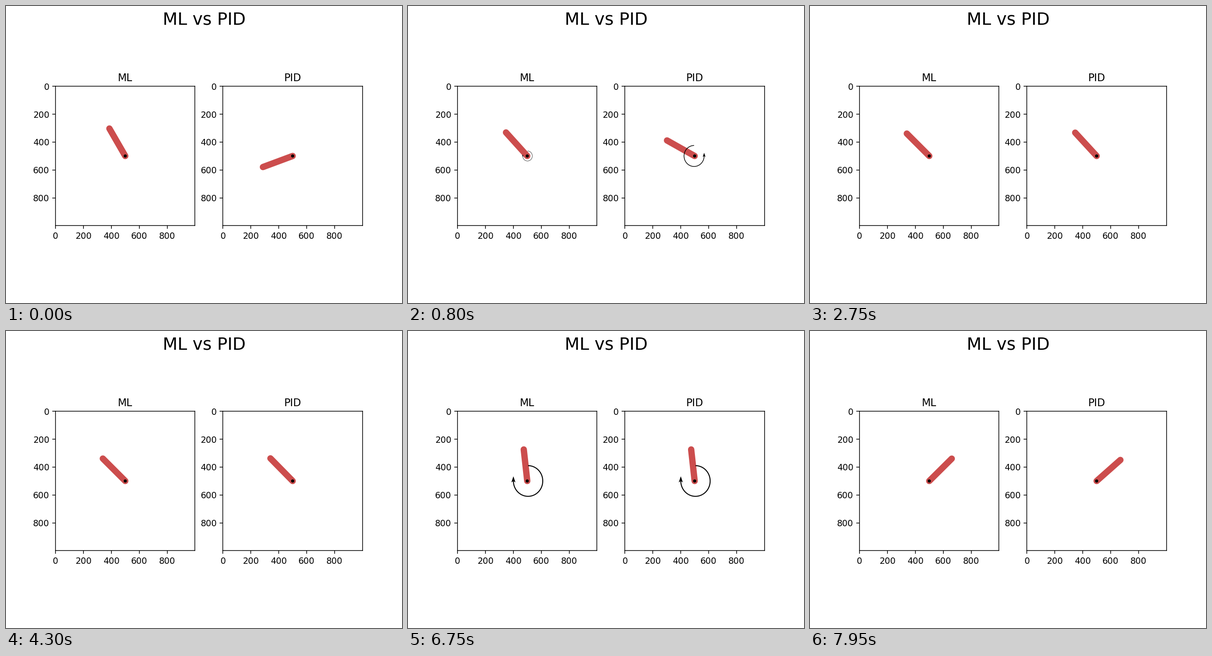
Animation of 864 by 648 pixels, one loop 8 s. Source, as a matplotlib script:

```python
import numpy as np
import matplotlib.pyplot as plt
from matplotlib.animation import FuncAnimation

DPI = 135
FRAMES, INTERVAL = 160, 50
DT = INTERVAL / 1000
SWITCH_STEP = 127            # the setpoint flips from 135 to 45 degrees here
MAX_TORQUE = 2.0
CENTER = 499.5
UNIT = 1000 / 4.4            # data units per rod length
UNIT_PX = UNIT * 0.30436     # screen pixels per rod length


def px_to_pt(pixels):
    return pixels * 72 / DPI


def simulate(angle, speed, kp, kd, ki=0.0):
    """Return rod angles and torques of a pendulum steered to the setpoint."""
    angles, torques = [angle], [0.0]
    integral = 0.0
    for step in range(1, FRAMES):
        setpoint = np.radians(135 if step < SWITCH_STEP else 45)
        error = setpoint - angle
        integral = np.clip(integral + ki * error * DT, -MAX_TORQUE, MAX_TORQUE)
        torque = np.clip(kp * error - kd * speed + integral, -MAX_TORQUE, MAX_TORQUE)
        speed += 3 * torque * DT
        angle += speed * DT
        angles.append(angle)
        torques.append(torque)
    return angles, torques


# Torque arrow in rod lengths: three quarters of an ellipse and a barbed head.
sweep = np.radians(np.linspace(90, -180, 90))
ARC = np.column_stack([0.026 + 0.463 * np.cos(sweep), 0.484 * np.sin(sweep)])
HEAD = np.array([(-0.437, 0.148), (-0.372, -0.045), (-0.437, 0.0), (-0.502, -0.045)])


def to_data(points):
    return CENTER + UNIT * np.asarray(points) * (1, -1)


class Panel:
    def __init__(self, ax, title, motion):
        self.angles, self.torques = motion
        ax.set_title(title)
        ax.set(xlim=(-0.5, 999.5), ylim=(999.5, -0.5), aspect="equal")
        ax.set_xticks(range(0, 1000, 200))
        ax.set_yticks(range(0, 1000, 200))
        self.rod, = ax.plot([], [], color=(0.8, 0.3, 0.3), zorder=2,
                            lw=px_to_pt(0.2 * UNIT_PX), solid_capstyle="round")
        self.arc, = ax.plot([], [], color="black", zorder=3, solid_capstyle="butt")
        self.head = ax.fill([0, 0, 0, 0], [0, 0, 0, 0], color="black", lw=0, zorder=3)[0]
        ax.add_patch(plt.Circle((CENTER, CENTER), 0.05 * UNIT, color="black", lw=0, zorder=4))

    def show(self, step):
        angle, torque = self.angles[step], self.torques[step]
        tip = (np.cos(angle), np.sin(angle))
        self.rod.set_data(*to_data([(0, 0), tip]).T)

        size = abs(torque) / MAX_TORQUE
        scale = np.array([-size if torque > 0 else size, size])
        self.arc.set_data(*to_data(ARC * scale).T)
        self.arc.set_linewidth(px_to_pt(2.1 * size))
        self.head.set_xy(to_data(HEAD * scale))
        for part in (self.arc, self.head):
            part.set_visible(size > 0.05)
        return self.rod, self.arc, self.head


fig, (left, right) = plt.subplots(1, 2, figsize=(864 / DPI, 648 / DPI), dpi=DPI)
fig.suptitle("ML vs PID", fontsize=20)
panels = [
    Panel(left, "ML", simulate(np.radians(120), -1.55, kp=8.33, kd=2.5)),
    Panel(right, "PID", simulate(np.radians(200.4), 1.0, kp=23, kd=7.9, ki=17)),
]


def update(step):
    return [part for panel in panels for part in panel.show(step)]


anim = FuncAnimation(fig, update, frames=FRAMES, interval=INTERVAL,
                     repeat=True, repeat_delay=0, blit=False)
plt.show()
```
